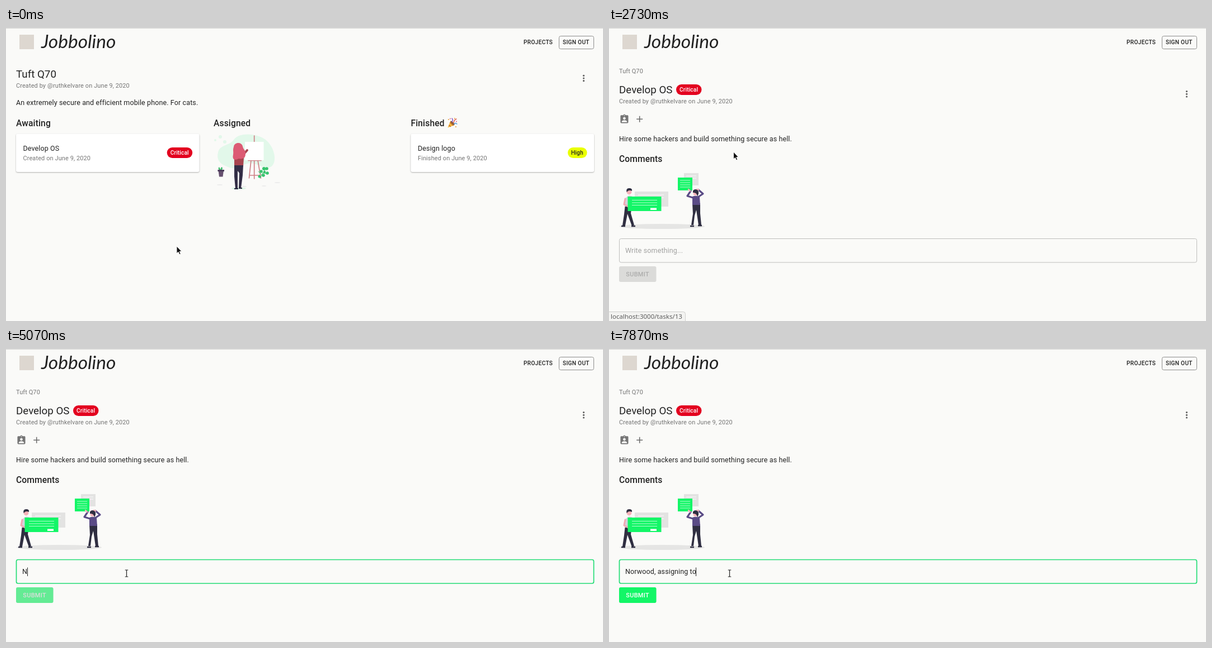
These frames come from a looping animation (1067x525 px, 8 s). An HTML page:

```html
<!DOCTYPE html>
<html lang="en">
<head>
<meta charset="utf-8">
<title>Task board</title>
<style>
html, body { margin: 0; width: 100%; height: 100%; overflow: hidden; background: #fafaf8; }
svg { display: block; }
text { font: 10.94px Roboto, sans-serif; letter-spacing: .117px; fill: #757575; white-space: pre; }
.body { font-size: 12.5px; fill: #222; }
.h5 { font-size: 18.75px; letter-spacing: 0; fill: #222; }
.h6 { font-size: 15.62px; font-weight: 500; fill: #222; }
.btn { font-weight: 500; letter-spacing: .31px; }
.small { font-size: 10.16px; letter-spacing: .29px; fill: #222; }
.chip { font-size: 10.16px; font-weight: 500; }
.brand { font: italic 33.5px Lato, sans-serif; letter-spacing: 0; fill: #222; }
.url { font: 11.55px "Noto Sans", sans-serif; letter-spacing: 0; fill: #5c5c5c; }
.card { fill: #fff; filter: drop-shadow(0 1px 1px rgba(0, 0, 0, .3)); }
.line { fill: none; stroke-linecap: round; stroke-linejoin: round; }
</style>
</head>
<body>
<svg width="1067" height="525" viewBox="0 0 1067 525">
  <defs>
    <clipPath id="cardClip"><path d="M18 195H345.5V258H18Z"/></clipPath>
    <g id="dots" fill="#616161"><circle r="1.6" cy="-4.7"/><circle r="1.6"/><circle r="1.6" cy="4.7"/></g>
    <g id="critical">
      <rect width="45.5" height="19" rx="9.5" fill="#e3001f"/>
      <text class="chip" x="6" y="13.4" style="fill:#fff">Critical</text>
    </g>
  </defs>

  <path d="M0 .5H1067" stroke="#d6d6d4"/>
  <rect x="24" y="12" width="26" height="26" fill="#ddd7d0"/>
  <text class="brand" x="63" y="36">Jobbolino</text>
  <text class="btn small" x="925" y="29.3">PROJECTS</text>
  <rect x="988.5" y="14.5" width="62" height="23" rx="3" fill="none" stroke="#8c8c8b"/>
  <text class="btn small" x="995" y="29.3">SIGN OUT</text>

  <g id="board">
    <text class="h5" x="18" y="89">Tuft Q70</text>
    <text x="18" y="107">Created by @ruthkelvare on June 9, 2020</text>
    <use href="#dots" x="1032.5" y="90"/>
    <text class="body" x="18" y="138">An extremely secure and efficient mobile phone. For cats.</text>
    <text class="h6" x="18" y="176">Awaiting</text>
    <text class="h6" x="371" y="176">Assigned</text>
    <text class="h6" x="723.5" y="176">Finished</text>

    <!-- party popper -->
    <path d="M789.5 178.5L794.5 166.5Q800 169 801.5 174Z" fill="#f6b73c"/>
    <path d="M791.5 174L795 177M793.5 169L799.5 175" stroke="#b9672e" stroke-width="1.3"/>
    <ellipse cx="798" cy="170.2" rx="1.7" ry="4.8" transform="rotate(-43 798 170.2)" fill="#8d5a37"/>
    <g class="line" stroke-width="1.4">
      <path d="M797 168Q800 165 797 162" stroke="#7a4cc2"/>
      <path d="M800 170Q801 164 805 163" stroke="#e2574c"/>
      <path d="M801 172Q803 169 806 172" stroke="#4a9be0"/>
    </g>
    <g fill="#e8a33a"><circle cx="791" cy="164" r="1.1"/><circle cx="802" cy="162" r="1"/><circle cx="804" cy="177" r="1.1"/></g>
    <g fill="#d9548c"><circle cx="794" cy="162.5" r=".9"/><circle cx="805" cy="167.5" r="1"/></g>

    <rect class="card" x="18" y="189.5" width="327.5" height="68.5" rx="3"/>
    <g clip-path="url(#cardClip)">
      <rect id="hover" x="18" y="195" width="327.5" height="63" opacity="0"/>
      <circle id="ripple" cx="222.5" cy="222" r="0" opacity=".09"/>
    </g>
    <text class="body" x="30.5" y="220">Develop OS</text>
    <text x="30.5" y="237">Created on June 9, 2020</text>
    <use href="#critical" x="287.7" y="214"/>

    <rect class="card" x="723.5" y="189.5" width="327.5" height="68.5" rx="3"/>
    <text class="body" x="736" y="220">Design logo</text>
    <text x="736" y="237">Finished on June 9, 2020</text>
    <rect x="1004" y="214" width="34.5" height="19" rx="9.5" fill="#eaff00"/>
    <text class="chip" x="1010" y="227.4" style="fill:#222">High</text>

    <!-- painter at an easel -->
    <path d="M379 223C382 208 400 212 408 199C419 185 456 189 469 205C482 220 484 243 473 249C460 255 447 239 431 243C414 248 409 255 394 248C381 243 376 235 379 223Z" fill="#e2f8ea"/>
    <g fill="#e2f8ea"><circle cx="383" cy="195" r="3"/><circle cx="374" cy="201" r="2"/><circle cx="391" cy="204" r="3"/></g>
    <g fill="#ececec"><ellipse cx="382" cy="281" rx="5" ry="1"/><ellipse cx="425" cy="284" rx="5" ry="1"/><ellipse cx="461" cy="283" rx="4" ry="1"/><ellipse cx="485" cy="277" rx="5" ry="1"/></g>
    <ellipse cx="416" cy="287.5" rx="13" ry="2" fill="#dcf6e5"/>
    <g class="line" stroke="#cf8087" stroke-width="1.7">
      <path d="M443.7 193V270M438 237L434.5 269M450 237L455.5 269M433 237.5H456M436 264H453"/>
    </g>
    <path d="M427 204H460.5V237H427Z" fill="#fff"/>
    <path d="M418 222L424 227L431 219" class="line" stroke="#a8454f" stroke-width="4"/>
    <path d="M408 232Q417 227 425 233L424 248H408Z" fill="#a8454f"/>
    <path d="M408 246H424L423 264L420 287H416L417 260L414 256L414 288H410L408 266Z" fill="#332e46"/>
    <path d="M407 213C408 204 421 204 423 212C424 218 429 219 428 226C428 235 420 235 416 234C409 238 404 236 406 227C407 221 405 219 407 213Z" fill="#dc5b74"/>
    <path d="M408 288H415M416 287H422" stroke="#2b2840" stroke-width="2"/>
    <path d="M379.5 255H389L387.5 266.5H381Z" fill="#66506f"/>
    <path d="M378.5 254H390V257H378.5Z" fill="#4b3d5b"/>
    <path d="M381 254Q378 252 381 249L384 254Q383 250 386 249Q388 252 386 254Z" fill="#43bd70"/>
    <path d="M454 269Q459 259 466 250M457 263L451 257M459 260L469 261" class="line" stroke="#43bd70"/>
    <g fill="#36c46d">
      <circle cx="461" cy="252" r="3"/><circle cx="466" cy="252" r="2.8"/><circle cx="456" cy="257" r="2.8"/><circle cx="467" cy="260" r="2.8"/>
      <circle cx="460" cy="264" r="2.8"/><circle cx="453" cy="266" r="2.5"/><circle cx="462" cy="258" r="2.2"/>
    </g>
  </g>

  <g id="task" display="none">
    <text x="18" y="81.3">Tuft Q70</text>
    <text class="h5" x="18" y="117">Develop OS</text>
    <use href="#critical" x="120" y="101"/>
    <text x="18" y="135">Created by @ruthkelvare on June 9, 2020</text>
    <use href="#dots" x="1032.5" y="118.3"/>
    <path transform="translate(18.1 154) scale(.781)" fill="#757575" d="M19 3h-4.18C14.4 1.84 13.3 1 12 1c-1.3 0-2.4.84-2.82 2H5c-1.1 0-2 .9-2 2v14c0 1.1.9 2 2 2h14c1.1 0 2-.9 2-2V5c0-1.1-.9-2-2-2zm-7 0c.55 0 1 .45 1 1s-.45 1-1 1-1-.45-1-1 .45-1 1-1zm0 4c1.66 0 3 1.34 3 3s-1.34 3-3 3-3-1.34-3-3 1.34-3 3-3zm6 12H6v-1.4c0-2 4-3.1 6-3.1s6 1.1 6 3.1V19z"/>
    <path d="M49.2 163.3H60.2M54.7 157.8V168.8" stroke="#6c6c6c" stroke-width="1.56"/>
    <text class="body" x="18" y="202.5">Hire some hackers and build something secure as hell.</text>
    <text class="h6" x="18" y="240">Comments</text>

    <!-- two people carrying notes -->
    <ellipse cx="95" cy="355.5" rx="76" ry="4.5" fill="#e5e5e4"/>
    <path d="M134 260H160V282H134ZM46 293H106V320H46Z" fill="#e3e3e2"/>
    <path d="M138 265H156M138 269H156M52 299H98M52 304H98" stroke="#f4f4f3" stroke-width="1.3"/>
    <path d="M29 316L41 318L39 332L45 353L41 355L33 333L29 354H24L27 334Z" fill="#2f2e41"/>
    <path d="M29 306Q35 297 42 302L42 320H28Z" fill="#d4d2dc"/>
    <path d="M29 306L27 316L36 321" class="line" stroke="#f0a9b4" stroke-width="3"/>
    <circle cx="36" cy="294" r="4.4" fill="#f6b3ba"/>
    <path d="M31.5 294Q30 287 36 287Q42 287 41 292Q36 290 34 292Z" fill="#2f2e41"/>
    <path d="M22 355H29M40 355H47" stroke="#2f2e41" stroke-width="2.5"/>
    <path d="M33.5 302H93.5V328H33.5ZM123 268H149V291H123Z" fill="#13f667"/>
    <path d="M41 308.5H86M41 313H86M41 317.5H86M127 273H145M127 277H145M127 281H145M127 285H145" stroke="#b4fdce" stroke-width="1.2"/>
    <path d="M74 322.5H85V326H74Z" fill="#fff"/>
    <path d="M149 314H163L163 332L165 353H160L156 326L153 336L151 353H147L150 333Z" fill="#2f2e41"/>
    <path d="M150 304L140 301L146 292M159 303L168 297L160 290" class="line" stroke="#5a4b86" stroke-width="3.2"/>
    <path d="M149 302Q156 299 162 303L163 317H149Z" fill="#5a4b86"/>
    <path d="M145 292L142 289M160 290L157 289" class="line" stroke="#f6b3ba" stroke-width="2.5"/>
    <circle cx="154.5" cy="296" r="4" fill="#f6b3ba"/>
    <path d="M150 295Q149 289 155 289Q161 290 160 297L158 302Q157 294 150 295Z" fill="#2f2e41"/>
    <path d="M145 355H152M159 354H166" stroke="#2f2e41" stroke-width="2.5"/>

    <rect id="field" x="18.5" y="377.5" width="1032" height="42.5" rx="3" fill="none"/>
    <text class="body" id="hint" x="29" y="403.4" style="fill:#a2a2a1">Write something...</text>
    <text class="body" id="typed" x="29" y="403.4"></text>
    <path id="caret" d="M0 391.5V407" stroke="#222"/>
    <rect x="18" y="427" width="66.5" height="28" rx="3" fill="#dbdbd9"/>
    <text class="btn" x="30.3" y="445" style="fill:#acacab">SUBMIT</text>
    <g id="submit">
      <rect x="18" y="427" width="66.5" height="28" rx="3" fill="#13f667"/>
      <text class="btn" x="30.3" y="445" style="fill:#fff">SUBMIT</text>
    </g>
  </g>

  <g id="status">
    <path d="M-1 508.5H132.5Q136.5 508.5 136.5 512.5V526H-1Z" fill="#f3f3f1" stroke="#cfcfcd"/>
    <text class="url" x="3" y="521">localhost:3000/tasks/13</text>
  </g>

  <g id="pointer" stroke-linejoin="round">
    <path id="arrow" d="M0 0V13L3 10.3L5 14.8L7.2 13.9L5.2 9.5H9Z" fill="#111" stroke="#fff" stroke-width=".9"/>
    <path id="hand" d="M0 1.3Q1.2-.6 2.6 1.2V5L8 6.2Q10 7 9.5 9L8.5 14H2.2L-2.6 9.2Q-3 7.2-1.2 7.5L.3 8.5Z" fill="#222" stroke="#fff" stroke-width=".9"/>
    <path id="beam" class="line" d="M-2.3-6H-.6L0-5.4L.6-6H2.3M0-5.4V5.4M-2.3 6H-.6L0 5.4L.6 6H2.3" stroke="#222" stroke-width="1.2"/>
  </g>
</svg>
<script>
const LOOP = 8000;
const message = "Norwood, assigning to";
const keys = [4930, 5130, 5300, 5430, 5600, 5670, 5730, 6670, 6830, 6930];
while (keys.length < message.length) keys.push(7070 + 80 * (keys.length - 10));

const el = id => document.getElementById(id);
const set = (id, attrs) => { for (const k in attrs) el(id).setAttribute(k, attrs[k]); };
const show = (id, on) => set(id, { display: on ? "inline" : "none" });
const ramp = (t, from, to) => Math.min(1, Math.max(0, (t - from) / (to - from)));
const ease = p => p * p * (3 - 2 * p);
const mix = (a, b, p) => a + (b - a) * p;

function drawPointer(t) {
  const toCard = ease(ramp(t, 900, 1520));
  const toField = ease(ramp(t, 3790, 4230));
  const x = mix(mix(305, 222.5, toCard), 215.5, toField);
  const y = mix(mix(391, 222, toCard), 402, toField);
  const overField = toField > 0 && y > 377;
  const overCard = t < 2730 && y < 258;
  set("pointer", { transform: `translate(${x} ${y})` });
  show("beam", overField);
  show("hand", overCard);
  show("arrow", !overField && !overCard);
  return overField;
}

function drawField(t, hovered) {
  const focused = t >= 4370;
  const count = keys.filter(k => t >= k).length;
  set("field", {
    stroke: focused ? "#22dc75" : hovered ? "#333" : "#bebebc",
    "stroke-width": focused ? 1.7 : 1
  });
  el("typed").textContent = message.slice(0, count);
  const width = count ? el("typed").getComputedTextLength() : 0;
  set("caret", { transform: `translate(${Math.floor(29 + width) + .5} 0)` });
  show("caret", focused && !(t >= 6330 && t < 6670));
  show("hint", !count);
  set("submit", { opacity: ease(ramp(t, 4930, 5180)) });
}

function frame(now) {
  const t = now % LOOP;
  const opened = t >= 2670;
  show("board", !opened);
  show("task", opened);
  set("hover", { opacity: .045 * ease(ramp(t, 1320, 1560)) });
  set("ripple", { r: 70 * ramp(t, 2570, 2670) });
  set("status", { opacity: ramp(t, 1640, 1730) * (1 - ramp(t, 2890, 3070)) });
  drawField(t, drawPointer(t));
  requestAnimationFrame(frame);
}
requestAnimationFrame(frame);
</script>
</body>
</html>
```
